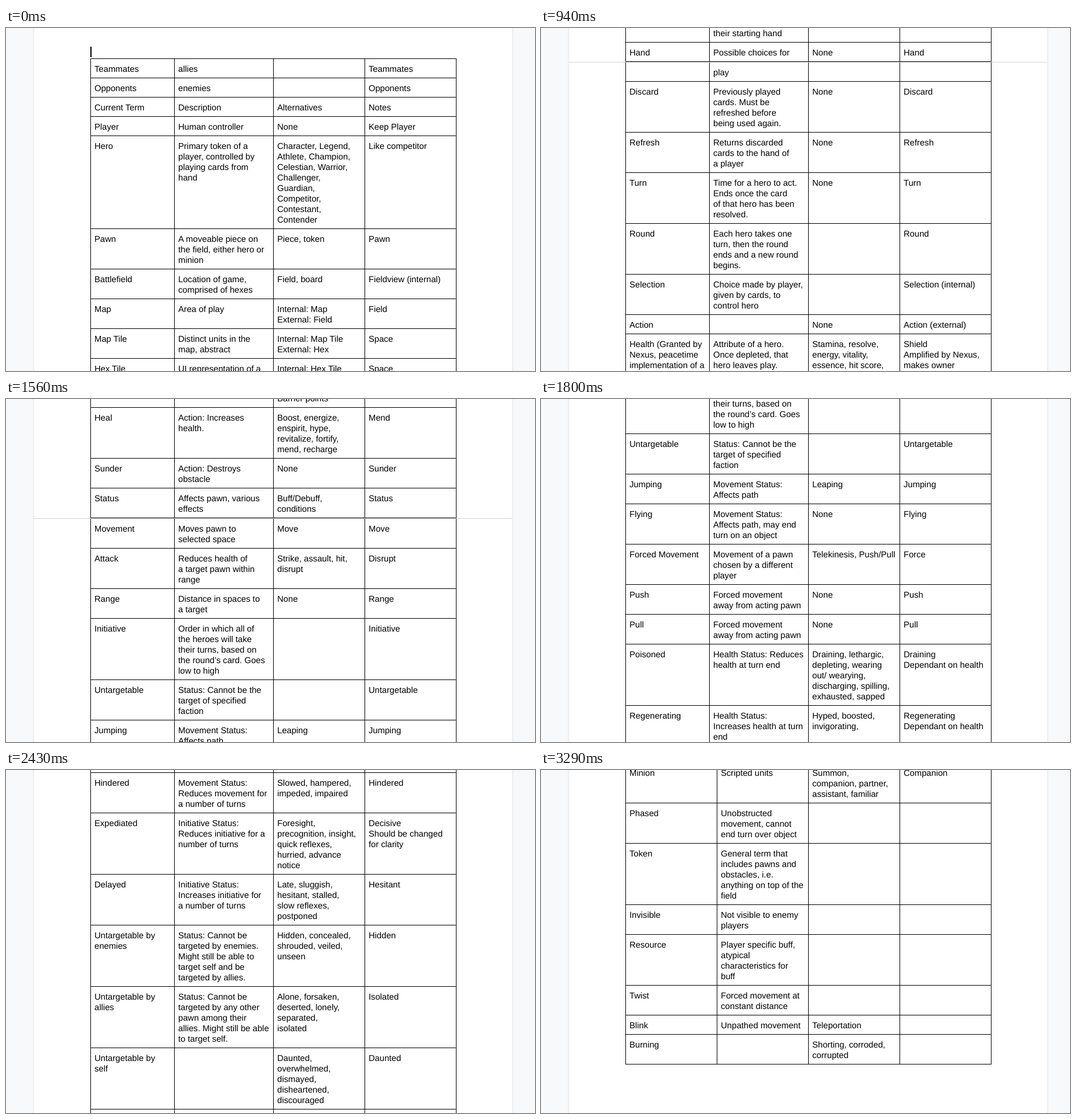
Animation, 903 px wide and 587 px high, one loop 3910 ms. Source, as an HTML page:

```html
<!DOCTYPE html>
<html lang="en">
<head>
<meta charset="utf-8">
<title>Game terms</title>
<style>
html, body { margin: 0; width: 100%; height: 100%; overflow: hidden; background: #f8f9fa; }
#stage { position: relative; width: 903px; max-width: 100%; height: 587px; max-height: 100%; overflow: hidden; }
#page {
  position: absolute; left: 48px; top: -10px; width: 816px; height: 607px;
  background: #fff; box-shadow: 0 0 0 1px #e9ebee, 0 0 3px 1px #e6e8eb;
}
#doc {
  position: absolute; left: 0; top: 0; width: 903px; will-change: transform;
  font: 14.667px/18px "Liberation Sans", Arial, sans-serif; color: #000;
}
#doc div { position: absolute; }
.cell { white-space: pre; font-kerning: normal; text-rendering: geometricPrecision; }
.ink { background: #000; }
.dots { background: repeating-linear-gradient(90deg, #a6a6a6 0 1px, #fff 1px 2px); }
</style>
</head>
<body>
<div id="stage">
  <div id="page"></div>
  <div id="doc"></div>
</div>
<script>
// One row per line: "|" parts cells, "~" parts lines, "---" is a page break.
const terms = `
Teammates|allies||Teammates
Opponents|enemies||Opponents
Current Term|Description|Alternatives|Notes
Player|Human controller|None|Keep Player
Hero|Primary token of a~player, controlled by~playing cards from~hand|Character, Legend,~Athlete, Champion,~Celestian, Warrior,~Challenger,~Guardian,~Competitor,~Contestant,~Contender|Like competitor
Pawn|A moveable piece on~the field, either hero or~minion|Piece, token|Pawn
Battlefield|Location of game,~comprised of hexes|Field, board|Fieldview (internal)
Map|Area of play|Internal: Map~External: Field|Field
Map Tile|Distinct units in the~map, abstract|Internal: Map Tile~External: Hex|Space
Hex Tile|UI representation of a~map tile|Internal: Hex Tile~External: Hex|Space
Obstacle|Alters possible paths,~both movement and~targeting|Hazard, obstruction|Obstacles
Card|Played by player,~contains actions that~control hero|None|Card
Deck|Starting hand||Deck
Library|All possible cards a~hero may include in~their starting hand|None|Library
Hand|Possible choices for|None|Hand
---
|play||
Discard|Previously played~cards. Must be~refreshed before~being used again.|None|Discard
Refresh|Returns discarded~cards to the hand of~a player|None|Refresh
Turn|Time for a hero to act.~Ends once the card~of that hero has been~resolved.|None|Turn
Round|Each hero takes one~turn, then the round~ends and a new round~begins.||Round
Selection|Choice made by player,~given by cards, to~control hero||Selection (internal)
Action||None|Action (external)
Health (Granted by~Nexus, peacetime~implementation of a~wartime~technology)|Attribute of a hero.~Once depleted, that~hero leaves play.|Stamina, resolve,~energy, vitality,~essence, hit score,~score, victory points,~achievement points,~ascension points,~defense, chutzpah~Shield, armor,~defense, barrier,~Barrier points|Shield~Amplified by Nexus,~makes owner~completely immune~while active
Heal|Action: Increases~health.|Boost, energize,~enspirit, hype,~revitalize, fortify,~mend, recharge|Mend
Sunder|Action: Destroys~obstacle|None|Sunder
Status|Affects pawn, various~effects|Buff/Debuff,~conditions|Status
---
Movement|Moves pawn to~selected space|Move|Move
Attack|Reduces health of~a target pawn within~range|Strike, assault, hit,~disrupt|Disrupt
Range|Distance in spaces to~a target|None|Range
Initiative|Order in which all of~the heroes will take~their turns, based on~the round’s card. Goes~low to high||Initiative
Untargetable|Status: Cannot be the~target of specified~faction||Untargetable
Jumping|Movement Status:~Affects path|Leaping|Jumping
Flying|Movement Status:~Affects path, may end~turn on an object|None|Flying
Forced Movement|Movement of a pawn~chosen by a different~player|Telekinesis, Push/Pull|Force
Push|Forced movement~away from acting pawn|None|Push
Pull|Forced movement~away from acting pawn|None|Pull
Poisoned|Health Status: Reduces~health at turn end|Draining, lethargic,~depleting, wearing~out/ wearying,~discharging, spilling,~exhausted, sapped|Draining~Dependant on health
Regenerating|Health Status:~Increases health at turn~end|Hyped, boosted,~invigorating,|Regenerating~Dependant on health
Empowered|Attack Status:~Increases attack for a||Empowered~Dependant on disrupt
---
|number of attacks||
Pacified|Attack Status: Reduces~attack for a number of~attacks||Pacified~Dependant on disrupt
Hastened|Movement Status:~Increases movement~for a number of moves|Faster, quickened,~hurried, speedy,~brisk, nimble, hasted,~swift|Hastened
Hindered|Movement Status:~Reduces movement for~a number of turns|Slowed, hampered,~impeded, impaired|Hindered
Expediated|Initiative Status:~Reduces initiative for a~number of turns|Foresight,~precognition, insight,~quick reflexes,~hurried, advance~notice|Decisive~Should be changed~for clarity
Delayed|Initiative Status:~Increases initiative for~a number of turns|Late, sluggish,~hesitant, stalled,~slow reflexes,~postponed|Hesitant
Untargetable by~enemies|Status: Cannot be~targeted by enemies.~Might still be able to~target self and be~targeted by allies.|Hidden, concealed,~shrouded, veiled,~unseen|Hidden
Untargetable by~allies|Status: Cannot be~targeted by any other~pawn among their~allies. Might still be able~to target self.|Alone, forsaken,~deserted, lonely,~separated,~isolated|Isolated
Untargetable by~self||Daunted,~overwhelmed,~dismayed,~disheartened,~discouraged|Daunted
Defeated|A pawn is defeated~when their health~reaches 0. The pawn is~removed from play.|Eliminated|Defeated
---
Not Defeated|||In Play
Win/Lose (End~Screen)|End game results.|Victory/Defeat,~Victory/Loss,~The Victorious/The~Defeated,~The Victors/~Champions/,~Ascend/Remain,~Rapture|The Victorious/The~Defeated`;

const future = `
Future Term|Description|Alternatives|Notes
Minion|Scripted units|Summon,~companion, partner,~assistant, familiar|Companion
Phased|Unobstructed~movement, cannot~end turn over object||
Token|General term that~includes pawns and~obstacles, i.e.~anything on top of the~field||
Invisible|Not visible to enemy~players||
Resource|Player specific buff,~atypical~characteristics for~buff||
Twist|Forced movement at~constant distance||
Blink|Unpathed movement|Teleportation|
Burning||Shorting, corroded,~corrupted|`;

const doc = document.getElementById("doc");

function box(cls, x, y, w, h) {
  const el = document.createElement("div");
  el.className = cls;
  el.style.left = x + "px";
  el.style.top = y + "px";
  if (w) {
    el.style.width = w + "px";
    el.style.height = h + "px";
  }
  return doc.appendChild(el);
}

// Lays out a table from y downwards and returns its bottom edge.
function table(text, cols, y) {
  const left = cols[0], right = cols[4], top = y, breaks = [];
  const rule = () => box("ink", left, y, right - left + 1, 1);
  rule();
  for (const row of text.trim().split("\n")) {
    if (row === "---") {
      breaks.push(++y);
      continue;
    }
    const cells = row.split("|").map(c => c.split("~"));
    cells.forEach((lines, i) => {
      if (lines[0]) box("cell", cols[i] + 7, y + 10).textContent = lines.join("\n");
    });
    y += 15 + 18 * Math.max(...cells.map(c => c.length));
    rule();
  }
  for (const x of cols) box("ink", x, top, 1, y - top + 1);
  for (const at of breaks) box("dots", 48, at, 816, 1);
  return y;
}

box("ink", 144, 32, 2, 18);
const end = table(terms, [144, 287, 456, 612, 768], 52);
table(future, [144, 300, 456, 612, 768], end + 61);

// Scroll curve: [step, offset, speed per step]
const LOOP = 3910, STEP = 78.25, LAST = 42;
const knots = [
  [0, 0, 32], [7, 400, 76], [16, 1224, 100], [23, 1957, 102],
  [27, 2346, 100], [35, 3231, 102], [42, 3754, 40]
];

function offset(step) {
  let i = 0;
  while (i < knots.length - 2 && step >= knots[i + 1][0]) i++;
  const [s0, y0, v0] = knots[i], [s1, y1, v1] = knots[i + 1];
  const d = s1 - s0, u = (step - s0) / d, w = 1 - u;
  return Math.round(
    y0 * (1 + 2 * u) * w * w + v0 * d * u * w * w +
    y1 * u * u * (3 - 2 * u) - v1 * d * u * u * w
  );
}

const start = performance.now();
function draw() {
  const t = Math.max(0, performance.now() - start) % LOOP;
  const step = Math.min(LAST, Math.floor((t + 3) / STEP));
  doc.style.transform = `translateY(${-offset(step)}px)`;
  requestAnimationFrame(draw);
}
draw();
</script>
</body>
</html>
```
